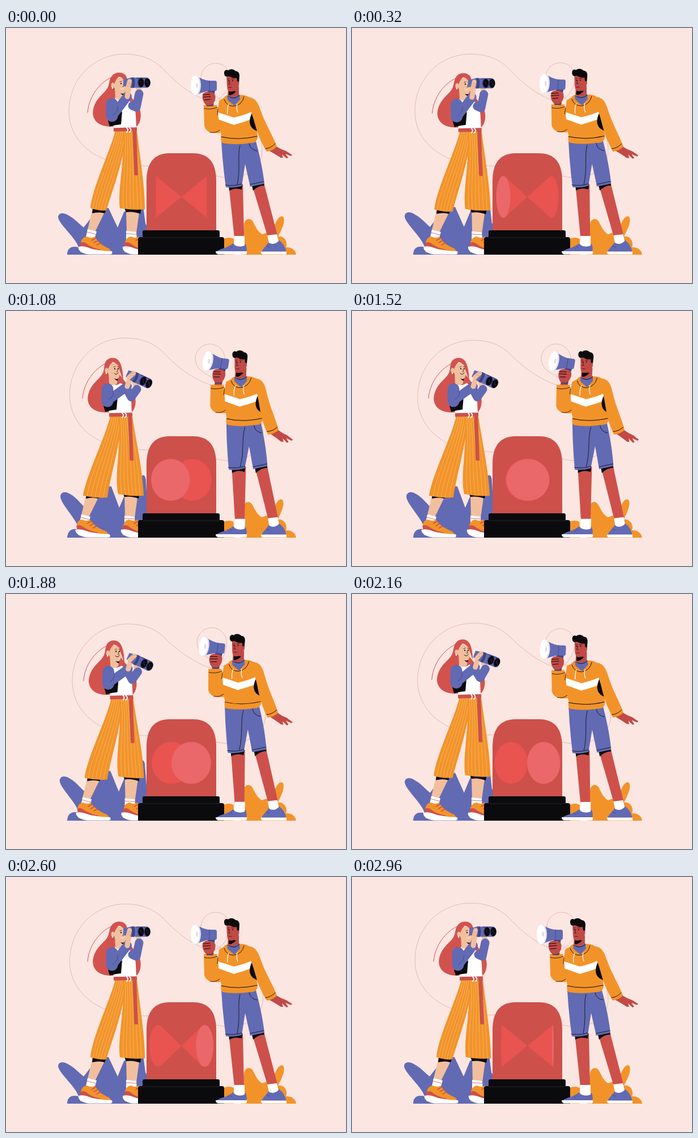
Recreate the animation shown at these times as an HTML page. Size 600x450 px, loop 3000 ms.

```html
<!DOCTYPE html>
<html lang="en">
<head>
<meta charset="utf-8">
<title>Lookout</title>
<style>
html, body { margin: 0; width: 100%; height: 100%; overflow: hidden; background: #fce6e1; }
svg { display: block; width: 600px; height: 450px; }
</style>
</head>
<body>
<svg id="stage" viewBox="0 0 600 450" stroke-linejoin="round"></svg>
<script>
const LOOP = 3000, STEP = 40;
const BLUE = '#626ab3', NAVY = '#3d4480', ORANGE = '#f2932a', STRIPE = '#f9c16f', RED = '#cd504b',
  HAIR = '#d2534e', SKIN = '#f2bf9e', BROWN = '#c14a46', BLACK = '#0b0a0d', WHITE = '#fff',
  GLOW = '#e95350', LENS = '#ea676a';
const stage = document.getElementById('stage');

const fill = (d, color) => `<path d="${d}" fill="${color}"/>`;
const line = (d, color, width, cap = 'round') =>
  `<path d="${d}" fill="none" stroke="${color}" stroke-width="${width}" stroke-linecap="${cap}"/>`;
const oval = (x, y, rx, ry, color) => `<ellipse cx="${x}" cy="${y}" rx="${rx}" ry="${ry}" fill="${color}"/>`;
const group = (transform, ...parts) => `<g transform="${transform}">${parts.join('')}</g>`;
const move = (x, y) => `translate(${x} ${y})`;
const mix = (a, b, k) => a.map((v, i) => v + (b[i] - v) * k);
const wave = k => (1 - Math.cos(Math.PI * Math.min(1, Math.max(0, k)))) / 2;
// rises during a..b, holds, falls during c..d
const swing = (t, a, b, c, d) => wave((t - a) / (b - a)) - wave((t - c) / (d - c));
// leans right by s and stretches by k, with the line y = base at rest
const lean = (s, k, base) => `matrix(1 0 ${-s} ${1 + k} ${base * s} ${-base * k})`;

function wire(q, m) {
  const x = 370 - 10 * m, y = 88 - 4 * m, dx = 6 * q, dy = 7 * q;
  return line(`M275 ${244 + dy * .7} C245 ${244 + dy} 235 ${243 + dy} 210 ${240 + dy}
    C${152 + dx} ${234 + dy} ${111 + dx} ${196 + dy} ${111 + dx} ${147 + dy}
    C${111 + dx} ${90 + dy} ${155 + dx} ${46 + dy} ${209 + dx} ${46 + dy}
    C${240 + dx} ${46 + dy} ${262 + dx / 2} ${56 + dy} 280 ${75 + dy / 3}
    S322 117 362 131 C378 128 ${x + 26} ${y + 20} ${x + 26} ${y}
    A26 26 0 1 0 ${x - 19} ${y + 18} C365 125 ${450 + dx} 150 ${452 + dx} 213
    C${453 + dx} 250 420 264 395 264 C375 264 360 258 330 250`, '#d8b0aa', .8);
}

function bushes(m) {
  return group(lean(.06 * m, .1 * m, 400), fill(`M108 400 C108 388 116 384 128 387 C124 371 93 346 92 334
      C92 326 101 325 109 330 C121 336 128 345 137 352 L165 316 L181 318 L197 352 L208 325
      L232 308 C232 298 239 297 241 306 L246 345 L250 352 V400Z`, BLUE)) +
    group(lean(-.02 * m, 0, 400), fill('M384 400 V372 Q394 368 402 372 V400Z', ORANGE),
      fill(`M415 400 L420 346 C423 334 433 335 437 344 C441 352 445 360 452 364 L470 358
      C474 346 482 328 489 333 C494 340 487 355 480 368 C492 366 498 379 494 387
      C504 386 511 392 512 400Z`, ORANGE));
}

function siren(t) {
  const angle = Math.PI * t / LOOP, a = 38 * Math.sin(angle), far = 45 * Math.cos(angle);
  const beam = d => {
    let cone = '';
    if (Math.abs(d) > a) {
      const x = d - a * a / d, y = 37 * Math.sqrt(1 - a * a / d / d);
      cone = fill(`M0 0 L${x} ${-y} V${y}Z`, GLOW);
    }
    return cone + oval(d, 0, a, 37, GLOW);
  };
  return fill('M248 360 V270 C248 237 262 221 289 221 H330 C357 221 371 237 371 270 V360Z', RED) +
    group(move(309.5, 298), beam(far), beam(-far), oval(-far, 0, a, 37, LENS)) +
    fill('M241 371 V360 Q241 357 244 357 H374 Q377 357 377 360 V371Z', BLACK) +
    fill('M233 400 V373 Q233 369 237 369 H381 Q385 369 385 373 V400Z', BLACK) +
    line('M242 370 H377', '#34333a', .7);
}

// a trouser leg is the space between two curves; the stripes lie in between
function trouser(left, right, stripes) {
  const curve = p => `M${p[0]} ${p[1]} C${p.slice(2)}`;
  const [x0, y0, x1, y1, x2, y2, x3, y3] = right;
  let out = fill(`${curve(left)} Q${(left[6] + x3) / 2} ${(left[7] + y3) / 2 + 3} ${x3} ${y3}
    C${x2} ${y2} ${x1} ${y1} ${x0} ${y0}Z`, ORANGE);
  for (let i = 1; i < stripes; i++) out += line(curve(mix(left, right, i / stripes)), STRIPE, .7, 'butt');
  return out;
}

function sneaker() {
  return fill('M132 378 Q135 368 143 368 Q150 372 157 368 C162 379 172 385 182 389 L187 396 H131Z', ORANGE) +
    fill('M131 379 Q138 376 144 382 Q154 389 168 391 L160 394 H131Z', RED) +
    fill('M128 386 C140 383 147 390 158 391 Q172 394 187 394 Q189 399 184 399.5 H146 C138 399 126 394 128 386Z', WHITE) +
    line('M151 375 L158 371 M155 379 L162 375 M160 383 L167 379', RED, 1.5);
}

function womanLegs(w) {
  const leg = (a, b) => mix(a, b, w);
  const shin = fill('M153 319 H177 L157 360 H143Z', SKIN) + fill('M153 318 H178 L174 327 Q164 324 152 327Z', BLACK) +
    fill('M144 355 L160 359 L156 373 Q148 374 141 369Z', WHITE) + line('M143 360 L158 364', RED, .8);
  const shin2 = fill('M212 319 H236 L230 362 H213Z', SKIN) + fill('M209 318 H239 L237 328 Q224 323 212 325Z', BLACK) +
    fill('M212 358 L230 360 L231 376 H212Z', WHITE) + line('M212 363 L230 364', RED, .8);
  return group(move(-11 * w, 4 * w), shin) +
    group(move(-3 * w, 0) + lean(-.18 * w, 0, 400), sneaker()) +
    group(move(-3 * w, 3 * w), shin2) + group(move(78 - 3 * w, 0), sneaker()) +
    trouser(leg([193, 181, 183, 220, 151, 285, 149, 318], [184, 185, 176, 222, 141, 290, 136, 326]),
      leg([213, 181, 209, 232, 187, 288, 177, 322], [205, 185, 202, 235, 184, 290, 179, 329]), 6) +
    trouser(leg([206, 181, 211, 228, 196, 288, 201, 318], [198, 185, 205, 230, 190, 290, 198, 323]),
      leg([231, 181, 236, 225, 245, 280, 245, 320], [223, 185, 229, 228, 242, 285, 243, 326]), 7);
}

function womanHead(b) {
  return fill('M192 105 L208 108 L207 124 Q199 130 193 124Z', SKIN) +
    fill('M198 107 L209 113 L208 119 Q202 118 198 107Z', BLACK) +
    fill('M189 88 H209 L212 101 Q212 116 206 116 C199 115 192 111 190 102Z', SKIN) +
    fill(`M187 112 C183 98 182 82 196 79 C209 77 ${215 + 2 * b} 86 ${213 + 5 * b} ${92 + 28 * b}
      Q${213 - b} ${93 + 10 * b} 209 92 Q203 86 199 86 C192 92 192 99 189 103 L191 114Z`, HAIR) +
    oval(188.5, 101, 3, 4.5, SKIN) + oval(188, 106, 1.2, 1.2, WHITE) +
    oval(203, 98, 1, 1.3, BLACK) + oval(209, 98, 1, 1.3, BLACK) +
    line('M201 95 l3 -1 M207.5 94 l3 1 M207 99 l1 4 h-2', BLACK, .7) +
    line(`M202 ${107 - b} Q206 110 209 ${106 - b}`, b < .5 ? WHITE : BLACK, .9);
}

function binoculars() {
  return fill('M-23 -6 L-13 -8 V8 L-23 6Z', BLUE) +
    fill('M-13 -8 Q-11 -9 -8 -9 H20 V9 H-9 Q-13 8 -13 8Z', BLUE) +
    fill('M-9 -9 H-4 Q-1 0 -4 9 H-9 Q-6 0 -9 -9Z', NAVY) + line('M1 -8 H16', NAVY, 1.3) +
    oval(8, 0, 6, 8.6, NAVY) + oval(8.5, 0, 5, 7.7, BLACK) +
    oval(19, 0, 6, 8.6, NAVY) + oval(19.5, 0, 5, 7.7, BLACK) +
    line('M7 -3 q1 4 4 6 M18 -3 q1 4 4 6', '#34395f', .8);
}

function woman(w, b) {
  const at = (a, z) => mix(a, z, b).join(' ');
  const near = at([214, 121], [222, 129]), elbow = at([188, 155], [190, 152]);
  const far = at([235, 116], [239, 134]), elbow2 = at([230, 140], [229, 148]);
  const torso = move(-8 * w, 4 * w);
  return group(move(-9 * w, 5 * w),
      fill(`M192 81 C180 87 184 99 179 106 C174 116 159 122 154 143 C150 160 162 174 184 174
        H230 C238 169 240 152 235 140 L210 108Z`, HAIR),
      line('M189 86 C173 91 147 114 144 149', HAIR, 1)) +
    womanLegs(w) +
    group(torso,
      fill('M193 123 Q202 130 210 123 C222 130 229 140 229 155 L230 178 H190 L187 130Z', WHITE),
      fill('M180 163 L205 147 L203 170 Q192 171 183 174Z', BLACK),
      line('M190 179.5 L231 178.5', RED, 6.5, 'butt'),
      line('M227 180 L230 260', RED, 6, 'butt'), line('M224 183 L227 258', '#a83f42', .7),
      line('M213 176 q4 4 0 8 M218 176 q5 4 0 8', WHITE, 1.8)) +
    group(move(-11 * w, 4 * w), womanHead(b)) +
    group(torso,
      line(`M${far} L${at([233, 101], [235, 121])}`, SKIN, 9),
      line(`M223 137 L${elbow2} L${far}`, BLUE, 15),
      line('M187 134 V155', BLUE, 21),
      line(`M${elbow} L${near}`, BLUE, 16),
      line(`M197 138 Q200 145 ${elbow}`, NAVY, .8),
      line(`M${near} L${at([217, 103], [227, 114])}`, SKIN, 9),
      group(`translate(${at([230, 96.5], [242.5, 116])}) rotate(${25 * b})`, binoculars()),
      line(`M${at([215, 106], [225, 113])} L${at([218, 94], [233, 106])}`, SKIN, 8),
      line(`M${at([214, 98], [227, 106])} l8 -1 m-8 5 l7 0`, '#d49b7f', .7));
}

function manHead() {
  return fill('M392 103 H411 V124 Q402 132 391 121Z', BROWN) +
    fill('M393 110 L406 112 Q400 119 393 119Z', BLACK) +
    fill('M389 83 H411 V100 C410 108 402 113 395 112 Q391 112 390 103Z', BROWN) +
    fill(`M386 84 C383 77 387 72 392 75 C396 71 403 73 405 76 C410 76 412 80 412 84 L411 99 L408 95
      L407 88 C400 90 396 85 392 85 Q388 87 386 84Z`, BLACK) +
    oval(409, 98, 2.4, 3.8, BROWN) +
    oval(393, 93, .9, 1.1, BLACK) + oval(400, 93, .9, 1.1, BLACK) +
    line('M391 90 l3 0 M398 90 l4 0 M395 93 l-2 6 h3 M393 105 q3 -1 5 0', BLACK, .7);
}

function megaphone() {
  return fill('M356 108 H369 L365 138 H354Z', NAVY) +
    fill('M335 83.5 Q345 91 358 93 H369 Q372 93 372 97 V107 Q372 111 369 111 H358 Q346 113 335 118.5Z', BLUE) +
    line('M359 93 V111', NAVY, .8) +
    oval(335, 101, 9, 18, '#e9e5ec') + oval(333.5, 101, 7.7, 17, WHITE) +
    oval(337, 101, 2, 4.5, '#e3dfe8') +
    fill('M347 117 Q351 111 360 113 Q367 113 369 118 Q371 126 366 133 L362 136 H353 Q345 128 347 117Z', BROWN) +
    line('M348 118 L360 117 M348 122 L361 121 M350 127 L360 126', BLACK, 1);
}

function man(m) {
  const shoes =
    fill('M370 395 C380 388 393 388 400 380 Q411 388 423 381 Q426 389 424 396 H371Z', BLUE) +
    fill('M370 394 H425 Q426 399 423 399.5 H374 Q370 398 370 394Z', WHITE) +
    fill('M450 396 C456 386 460 384 464 377 Q472 383 481 374 Q492 381 495 396Z', BLUE) +
    fill('M450 394.5 H495 V399.5 H453 Q449 398 450 394.5Z', WHITE) +
    line('M391 386 l4 4 M395 384 l4 4 M460 385 l5 2', NAVY, .8);
  const legs =
    fill('M393 276 H418 L420 370 H403Z', RED) + fill('M393 276 H417 L416 285 Q404 281 394 287Z', BLACK) +
    fill('M433 273 H455 L479 366 L462 369Z', RED) + fill('M433 273 H455 L456 278 Q445 278 436 287Z', BLACK) +
    fill('M403 367 H421 V384 Q412 388 403 383Z', WHITE) +
    fill('M461 366 L478 364 L481 376 Q473 384 464 379Z', WHITE) +
    fill('M380 200 H441 Q452 240 456 275 L431 280 L422 240 L416 279 Q401 283 388 281 Q382 238 380 200Z', BLUE) +
    line('M413 207 C408 225 414 250 408 276 M429 204 Q431 215 443 217 M387 277 Q401 280 416 275 M431 276 L455 271',
      BLACK, .8);
  const arm = group(`rotate(${4 * m} 434 135)`,
    fill(`M463 211 L477 209 Q485 214 494 217 L505 224 L503 226 L493 222 L498 229 L495 230 L487 223
      L489 229 L485 229 Q474 222 465 217Z`, BROWN),
    fill('M424 122 C440 121 445 132 450 147 C458 170 470 188 478 209 Q471 217 460 218 Q446 195 440 172 Q436 157 432 147Z', ORANGE),
    line('M458 213 Q468 212 475 204', BLACK, .9));
  const body =
    fill('M376 128 L390 120 H423 Q437 124 439 140 L444 193 Q443 203 432 203 Q403 207 382 203 Q378 199 380 190 L372 160Z', ORANGE) +
    fill('M374 149 Q390 154 402 158 Q420 154 433 148 L436 160 Q420 166 402 171 L374 161Z', WHITE) +
    fill('M434 150 Q440 150 442 160 L444 182 Q431 178 430 166 Q430 158 434 150Z', BLACK) +
    line('M380 192 Q410 199 443 191', BLACK, 1);
  const sleeve = group(move(0, -3 * m),
    fill('M349 136 H372 L374 148 L378 185 Q354 188 350 173Z', ORANGE),
    line('M350 142 Q361 145 373 140 M374 142 L373 153 M377 180 Q371 186 360 184', BLACK, .8));
  const hood = fill('M383 127 Q386 117 394 119 L403 134 L413 118 Q428 118 431 126 Q420 140 403 140 Q389 139 383 127Z', ORANGE) +
    fill('M390 119 Q401 126 412 117 L413 126 L403 137 L391 127Z', BLUE) +
    line('M385 126 Q389 138 402 138 Q417 136 420 121 M392 120 Q402 128 412 119', BLACK, .9) +
    line('M393 134 Q390 142 391 151 M408 134 Q406 142 409 149', WHITE, 1.2);
  const wrist = line(`M361 141 L${359 + 5 * m} ${130 - 8 * m}`, BROWN, 13);
  return shoes + group(lean(.0464 * m, .01 * m, 392),
    legs, body, arm, manHead(), hood, wrist, sleeve,
    group(`translate(${5 * m} ${-7 * m}) rotate(${7 * m} 358 120)`, megaphone()));
}

function draw(now) {
  const t = Math.floor(now % LOOP / STEP) * STEP;
  const w = swing(t, 0, 900, 1600, 2550), m = swing(t, 0, 1000, 1500, 2500),
    b = swing(t, 700, 1000, 2050, 2450), q = ((1 + Math.cos(2 * Math.PI * (t - 1840) / LOOP)) / 2) ** 2;
  stage.innerHTML = wire(q, m) + bushes(m) + woman(w, b) + siren(t) + man(m);
}

const start = performance.now();
function tick() {
  draw(performance.now() - start);
  requestAnimationFrame(tick);
}
tick();
</script>
</body>
</html>
```
